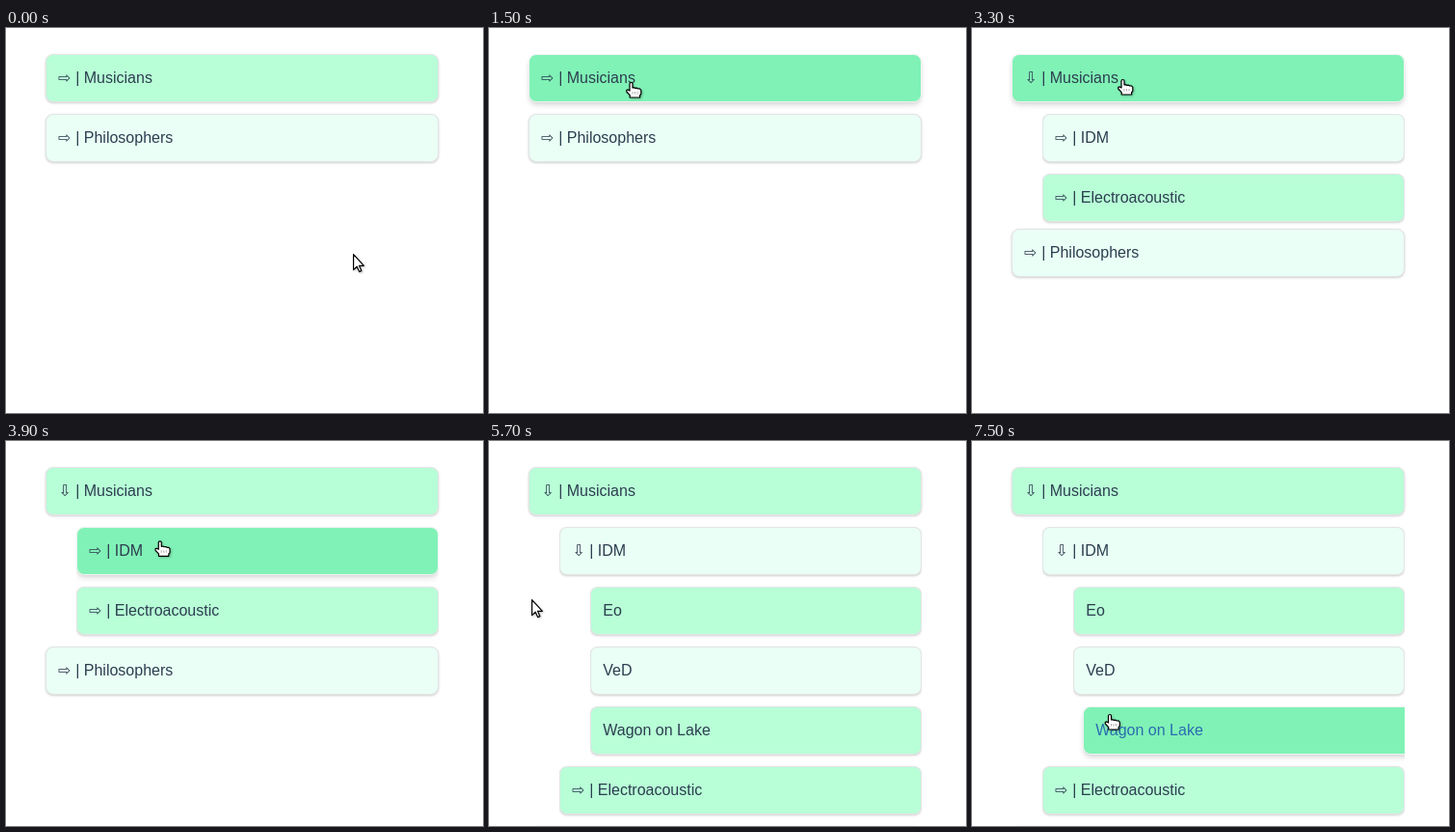
Animation of 495x399 px, one loop 8000 ms. Source, as an HTML page:

```html
<!DOCTYPE html>
<html lang="en">
<head>
<meta charset="utf-8">
<title>Tree list</title>
<style>
  html, body { margin: 0; width: 100%; height: 100%; overflow: hidden; background: #fff; }
  #stage { position: relative; width: 495px; height: 399px; overflow: hidden; }
  #tree { position: absolute; left: 41px; top: 27px; width: 408px; }
  .row {
    --h: 0;
    --base: #b8ffd7;
    --mix: calc(var(--h) * 100%);
    box-sizing: border-box;
    height: 50px;
    margin-bottom: 12px;
    padding: 0 12.3px;
    border: 1px solid color-mix(in srgb, #eff3f2 var(--mix), #e2e4e6);
    border-radius: 8px;
    font: 16px/47px "Liberation Sans", Arial, "DejaVu Sans", sans-serif;
    white-space: pre;
    color: #2c3e50;
    background: color-mix(in srgb, #80f2b6 var(--mix), var(--base));
    box-shadow:
      0 calc(1px + 3px * var(--h)) calc(3px + 3px * var(--h)) calc(-1px * var(--h)) rgba(0, 0, 0, .12),
      0 calc(1px + 1px * var(--h)) calc(2px + 2px * var(--h)) calc(-1px * var(--h)) rgba(0, 0, 0, .08);
  }
  .pale { --base: #eafff5; }
  .leaf {
    color: color-mix(in srgb, #2b6cb0 var(--mix), #2c3e50);
    transform: translateX(calc(10px * var(--h)));
  }
  .kids { margin-left: 32px; height: 0; overflow: hidden; }
  #cursor { position: absolute; left: 0; top: 0; overflow: visible; filter: drop-shadow(1px 1px 1px rgba(0, 0, 0, .25)); }
  #cursor path { fill: #fff; stroke: #000; stroke-width: 1.2; stroke-linejoin: round; }
  #cursor .lines { fill: none; stroke: #999; stroke-width: .8; }
</style>
</head>
<body>
<div id="stage">
  <div id="tree">
    <div class="row" id="musicians"><span>⇨</span> | Musicians</div>
    <div class="kids" id="genres">
      <div class="row pale" id="idm"><span>⇨</span> | IDM</div>
      <div class="kids" id="bands">
        <div class="row leaf" id="first">Eo</div>
        <div class="row leaf pale" id="second">VeD</div>
        <div class="row leaf" id="third">Wagon on Lake</div>
      </div>
      <div class="row"><span>⇨</span> | Electroacoustic</div>
    </div>
    <div class="row pale" id="philosophers"><span>⇨</span> | Philosophers</div>
  </div>
  <svg id="cursor" width="20" height="22">
    <path id="arrow" d="M.6 .6V16.6L4.2 13.2L6.6 18.6L8.8 17.6L6.5 12.3H11.4Z"/>
    <g id="hand" transform="translate(-5 0)">
      <path d="M4 9V2a1.5 1.5 0 0 1 3 0V6l1.6-.3 1.2.7 1.7-.2 1.2.8 1.7-.1 1.4 1.4V12.5l-1.2 1.2V16H4.2V13.6L.8 10V8.3L2.2 7.9Z"/>
      <path class="lines" d="M7 10v2.5M9.5 10v2.5M12 10v2.5"/>
    </g>
  </svg>
</div>
<script>
const LOOP = 8000, STEP = 100, FADE = 200, OPEN = 300;
const $ = id => document.getElementById(id);

// The row under the pointer from each time on
const visits = [
  [1080, "philosophers"], [1300, "musicians"], [2000, "philosophers"], [2460, "musicians"],
  [3720, "idm"], [5350, null], [5900, "first"], [6360, "second"], [6990, "third"]
];

// Pointer moves: start, end, x, y
const home = [360, 234];
const moves = [
  [800, 1500, 147, 56], [2000, 2200, 152, 100], [2400, 2700, 156, 53],
  [3400, 4000, 159.5, 107], [5100, 5600, 27, 160], [5600, 5700, 44, 164],
  [5700, 6100, 126, 180], [6200, 6600, 131, 244], [6800, 7200, 142.5, 283]
];

const clamp = v => Math.min(1, Math.max(0, v));
const easeOut = (v, power = 2) => 1 - (1 - clamp(v)) ** power;

function pointer(t) {
  let [x, y] = home;
  for (const [start, end, toX, toY] of moves) {
    const p = easeOut((t - start) / (end - start), 1.5);
    x += (toX - x) * p;
    y += (toY - y) * p;
  }
  return [x, y];
}

// A list grows to just short of its height, then settles
function grown(t, start, settle, height, gap) {
  return t < settle ? (height - gap) * easeOut((t - start) / OPEN) : height;
}

function setOpen(row, list, height) {
  $(row).firstChild.textContent = height > 0 ? "⇩" : "⇨";
  $(list).style.height = Math.round(height) + "px";
}

function render(t) {
  const levels = { musicians: 0, philosophers: 0, idm: 0, first: 0, second: 0, third: 0 };
  let over = null;
  visits.forEach(([start, id], i) => {
    const end = i + 1 < visits.length ? visits[i + 1][0] : Infinity;
    if (t >= start) over = id;
    if (id) levels[id] += easeOut((t - start) / FADE) - easeOut((t - end) / FADE);
  });
  for (const id in levels) $(id).style.setProperty("--h", levels[id].toFixed(3));

  const bands = grown(t, 4300, 5000, 186, 2);
  setOpen("idm", "bands", bands);
  setOpen("musicians", "genres", grown(t, 3000, 3500, 124, 5) + bands);

  const [x, y] = pointer(t);
  $("cursor").style.transform = `translate(${x}px, ${y}px)`;
  $("arrow").style.display = over ? "none" : "";
  $("hand").style.display = over ? "" : "none";
}

// The picture advances ten times a second
const begin = performance.now();
function tick() {
  const t = (performance.now() - begin) % LOOP;
  render(Math.floor(t / STEP) * STEP);
  requestAnimationFrame(tick);
}
tick();
</script>
</body>
</html>
```
